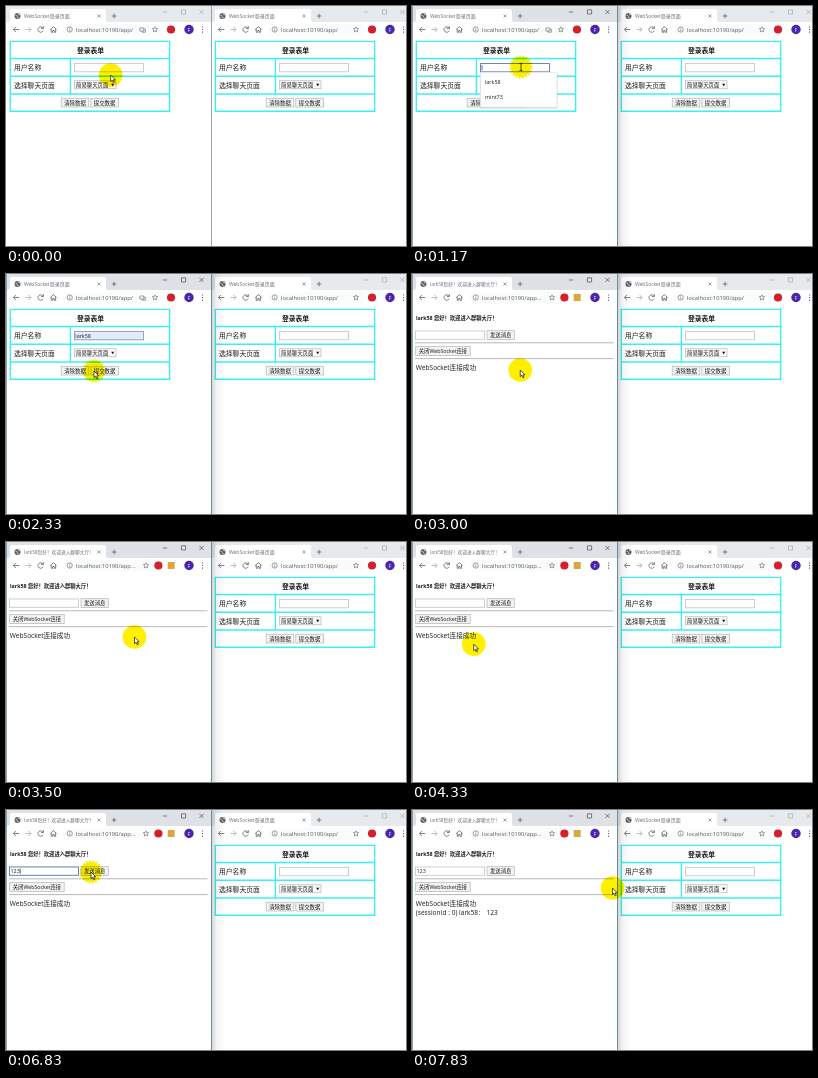
Recreate the animation shown at these times as an HTML page. Size 400x240 px, loop 8 s.

```html
<!DOCTYPE html>
<html lang="zh-CN">
<head>
<meta charset="utf-8">
<title>WebSocket登录页面</title>
<style>
html, body { margin: 0; width: 100%; height: 100%; overflow: hidden; background: #fff; }
svg { display: block; width: 400px; height: 240px; }
text {
  font-family: "Open Sans", "Noto Sans CJK SC", "Noto Sans CJK", sans-serif;
  dominant-baseline: central; fill: #1c1c1c; white-space: pre;
}
.win { --strip: #e7eaed; color: #9a9ea2; }
.win.active { --strip: #dee1e6; color: #333; }
.strip { fill: var(--strip); }
.ctl { fill: none; stroke: currentColor; stroke-width: .6; }
.icon { fill: none; stroke: #5f6469; stroke-width: .8; }
.thin { stroke-width: .6; }
.tab { font-size: 5px; fill: #6a6e72; }
.url { font-size: 5.8px; fill: #55595d; }
.row { font-size: 6.8px; }
.log { font-size: 6.6px; }
.ui { font-size: 5.4px; }
.bold { font-weight: 700; }
.mid { text-anchor: middle; }
.grid { fill: none; stroke: #3ceff3; stroke-width: 1.4; }
.btn { fill: #f3f3f3; stroke: #b4b4b4; stroke-width: .7; }
.field { fill: #fff; stroke: #c2c2c2; stroke-width: .8; }
.focus { fill: #fff; stroke: #6c87bd; stroke-width: 1; }
.caret { stroke: #111; stroke-width: .6; }
.rule { stroke: #b0b0b0; stroke-width: .9; }
.halo { fill: #fff000; mix-blend-mode: multiply; }
.burst { fill: #f9ee08; stroke: #f9ee08; stroke-width: 3; stroke-dasharray: 2 1.2; mix-blend-mode: multiply; }
</style>
</head>
<body>
<svg viewBox="0 0 400 240">
  <defs>
    <linearGradient id="shade">
      <stop offset="0" stop-color="#000" stop-opacity=".16"/>
      <stop offset=".35" stop-color="#000" stop-opacity=".05"/>
      <stop offset="1" stop-color="#000" stop-opacity="0"/>
    </linearGradient>
    <path id="star" class="icon thin" d="M0-2.7 .8-.9 2.7-.8 1.2.5 1.7 2.4 0 1.4-1.7 2.4-1.2.5-2.7-.8-.8-.9Z"/>
    <circle id="stop" r="4.1" fill="#d3202c"/>

    <g id="chrome">
      <rect width="205" height="240" fill="#fff"/>
      <rect class="strip" width="205" height="16"/>
      <path d="M2 16Q4 16 4 14V5Q4 3 6 3H98Q100 3 100 5V14Q100 16 102 16Z" fill="#fff"/>
      <circle cx="11.5" cy="10" r="3" fill="#5a5f64"/>
      <path d="M9.4 9.2q1.8 0 2 1.5t1.4 1.5M12 7.3q-.3 1.4 2 1.5" fill="none" stroke="#fff" stroke-width=".7"/>
      <path class="icon thin" d="M91.5 8.5l3 3M94.5 8.5l-3 3"/>
      <path class="icon" d="M105.8 10h4.6M108.1 7.7v4.6"/>
      <rect x="57" y="17.8" width="99" height="11.6" rx="5.8" fill="#f1f3f4" opacity=".35"/>
      <path class="icon" d="M13.3 23.5H7.5M10 20.9l-2.6 2.6 2.6 2.6"/>
      <path class="icon" d="M19.5 23.5h5.5M22.5 20.9l2.6 2.6-2.6 2.6" style="stroke:#a9adb1"/>
      <path class="icon" d="M37 22.2a2.7 2.7 0 1 0 .2 2.3M37.4 20.2v2.3h-2.4"/>
      <path class="icon" d="M44.2 23.5l3.2-2.8 3.2 2.8M45.2 23v3.3h1.5v-1.8h1.4v1.8h1.5V23"/>
      <circle class="icon thin" cx="63.7" cy="23.5" r="2.6"/>
      <path class="icon thin" d="M63.7 23.1v2M63.7 21.7v.7"/>
    </g>
    <g id="corner">
      <path class="ctl" d="M156.8 6h4.4M175.4 3.8h4.2v4.2H175.4ZM193.4 3.8l4.2 4.2M197.6 3.8L193.4 8"/>
      <circle cx="183" cy="23.5" r="4.7" fill="#4a25ad"/>
      <text class="mid" x="183" y="23.5" font-size="4.8" style="fill:#fff">F</text>
      <path d="M196 20.4h1.1v1.1H196ZM196 23h1.1v1.1H196ZM196 25.6h1.1v1.1H196Z" fill="#5f6469"/>
    </g>

    <g id="loginText">
      <text class="tab" x="18" y="10">WebSocket登录页面</text>
      <text class="url" x="70" y="23.5">localhost:10190/app/</text>
    </g>
    <g id="loginTools">
      <use href="#star" x="149" y="23.5"/>
      <use href="#stop" x="165" y="23.5"/>
    </g>
    <g id="chatBar">
      <text class="tab" x="18" y="10" style="font-size:4.7px">lark58您好！欢迎进入群聊大厅！</text>
      <text class="url" x="70" y="23.5">localhost:10190/app...</text>
      <use href="#star" x="140" y="23.5"/>
      <use href="#stop" x="152.4" y="23.5"/>
      <rect x="161.7" y="20" width="7" height="7" fill="#dca63e"/>
    </g>

    <g id="form">
      <path class="grid" d="M4.3 35.4H163.6V105.3H4.3ZM4.3 52.5H163.6M4.3 70.3H163.6M4.3 88H163.6M64.4 52.5V88"/>
      <text class="row bold mid" x="84.5" y="44">登录表单</text>
      <text class="row" x="8" y="61.3">用户名称</text>
      <text class="row" x="8" y="79">选择聊天页面</text>
      <rect class="field" x="68.5" y="57.5" width="69" height="8.3"/>
      <rect class="btn" x="68.5" y="74.8" width="41.5" height="8" style="fill:#fafafa"/>
      <text class="ui" x="70" y="79">简易聊天页面</text>
      <path d="M105.2 77.8h3l-1.5 2.5Z"/>
      <rect class="btn" x="55.2" y="92.2" width="27.6" height="8.8"/>
      <rect class="btn" x="84.8" y="92.2" width="27.6" height="8.8"/>
      <text class="ui mid" x="69" y="96.7">清除数据</text>
      <text class="ui mid" x="98.6" y="96.7">提交数据</text>
    </g>
  </defs>

  <g class="win" transform="translate(205)">
    <use href="#chrome"/>
    <use href="#loginText"/>
    <g transform="translate(-4)">
      <use href="#corner"/><use href="#loginTools"/>
    </g>
    <use href="#form"/>
  </g>
  <rect x="206" width="13" height="240" fill="url(#shade)" data-on="4 47"/>

  <g class="win" id="left">
    <use href="#chrome"/><use href="#corner"/>
    <g data-on="0 15">
      <use href="#loginText"/><use href="#loginTools"/>
      <path class="icon thin" d="M133.8 22h4v3h-4ZM136 25v1.2h3.4v-3h-1.6"/>
      <use href="#form"/>
      <rect class="focus" x="68.5" y="57.5" width="69" height="8.3" data-on="4 10"/>
      <path class="caret" d="M70 59v5.4" data-on="4 10"/>
      <g data-on="11 15">
        <rect class="field" x="68.5" y="57.5" width="69" height="8.3" style="fill:#e3ebfc;stroke:#8794b4"/>
        <text class="ui" x="69.3" y="61.6">lark58</text>
      </g>
      <g data-on="7 10">
        <rect x="68" y="67" width="77.5" height="35.5" rx="1" fill="#000" opacity=".14"/>
        <rect x="68.3" y="66.3" width="76.7" height="35" rx="1" fill="#fff" stroke="#d4d4d4" stroke-width=".5"/>
        <rect x="68.5" y="69" width="76.3" height="14.5" fill="#e9eaec" data-on="9 10"/>
        <text class="ui" x="73" y="76.3">lark58</text>
        <text class="ui" x="73" y="90.8">mint73</text>
      </g>
    </g>
    <g data-on="16 47">
      <use href="#chatBar"/>
      <text class="bold" x="4" y="44" font-size="5.3">lark58 您好！欢迎进入群聊大厅！</text>
      <rect class="field" x="3.5" y="57" width="69" height="8.3"/>
      <rect class="focus" x="3.5" y="57" width="69" height="8.3" data-on="31 41"/>
      <text class="ui" id="typed" x="4.5" y="61.2"></text>
      <path class="caret" id="caret" d="M4.9 58.6v5.2" data-on="31 41"/>
      <rect class="btn" x="75" y="56.7" width="27.3" height="8.9"/>
      <text class="ui mid" x="88.7" y="61.2">发送消息</text>
      <path class="rule" d="M3 68.8H201.5M3 84.6H201.5"/>
      <rect class="btn" x="3.7" y="72.5" width="54.5" height="8.9"/>
      <text class="ui mid" x="31" y="77" style="font-size:5.3px">关闭WebSocket连接</text>
      <text class="log" x="3.8" y="93.6">WebSocket连接成功</text>
      <text class="log" x="3.8" y="102" data-on="42 47">(sessionId : 0) lark58： 123</text>
    </g>
  </g>
  <path d="M205.5 0V240" stroke="#95a2aa" data-on="0 3"/>
  <path d="M205.5 0V240M.3 0V240" stroke="#6f8a98" data-on="4 47"/>

  <g id="pointer">
    <circle class="halo" r="11.8" id="halo"/>
    <circle class="burst" r="10" id="burst"/>
    <path id="beam" d="M-1.6-3.6H1.6M-1.6 3.6H1.6M0-3.6V3.6" stroke="#222" stroke-width=".8"/>
    <path id="arrow" d="M0 0V6.6L1.6 5.2 2.7 7.8 3.8 7.3 2.7 4.8H4.7Z" fill="#fff" stroke="#111" stroke-width=".7"/>
  </g>
</svg>
<script>
const LOOP = 8000, FPS = 6, LAST = 47;
const $ = id => document.getElementById(id);
const parts = [...document.querySelectorAll('[data-on]')].map(el => [el, ...el.dataset.on.split(' ').map(Number)]);

// pointer stops: step, x, y
const stops = [
  [0, 104.7, 69], [1, 104.7, 68], [4, 109, 61], [8, 109, 61], [10, 84, 76], [11, 84, 76],
  [13, 88, 97], [16, 88, 97], [20, 128.5, 95], [22, 128.5, 95], [27, 54, 103], [28, 50, 98],
  [30, 40, 61], [31, 40, 61], [32, 50, 68], [36, 50, 68], [39, 85, 62], [42, 85, 62],
  [44, 112, 98], [46, 186, 84], [47, 200.5, 78]
];
const clicks = [4, 7, 11, 14, 31, 41];
const within = (k, a, b) => k >= a && k <= b;
const show = (el, on) => { el.style.display = on ? '' : 'none'; };

function pointerAt(k) {
  const i = Math.max(1, stops.findIndex(s => s[0] >= k));
  const [k0, x0, y0] = stops[i - 1], [k1, x1, y1] = stops[i];
  const p = (k - k0) / (k1 - k0), e = p * p * (3 - 2 * p);
  return [x0 + (x1 - x0) * e, y0 + (y1 - y0) * e];
}

function draw(k) {
  for (const [el, a, b] of parts) show(el, within(k, a, b));
  $('left').classList.toggle('active', k >= 4);

  const count = Math.max(0, Math.min(3, k - 34));
  $('typed').textContent = '123'.slice(0, count);
  $('caret').setAttribute('transform', `translate(${count * 3.1})`);

  const click = clicks.includes(k), beam = within(k, 3, 8) || within(k, 30, 31);
  $('pointer').setAttribute('transform', `translate(${pointerAt(k)})`);
  show($('halo'), !click);
  show($('burst'), click);
  show($('beam'), beam);
  show($('arrow'), !beam);
}

let shown = -1;
function tick() {
  const t = performance.now() % LOOP;
  const k = Math.min(LAST, Math.floor((t + 4) * FPS / 1000));
  if (k !== shown) draw(shown = k);
  requestAnimationFrame(tick);
}
tick();
</script>
</body>
</html>
```
